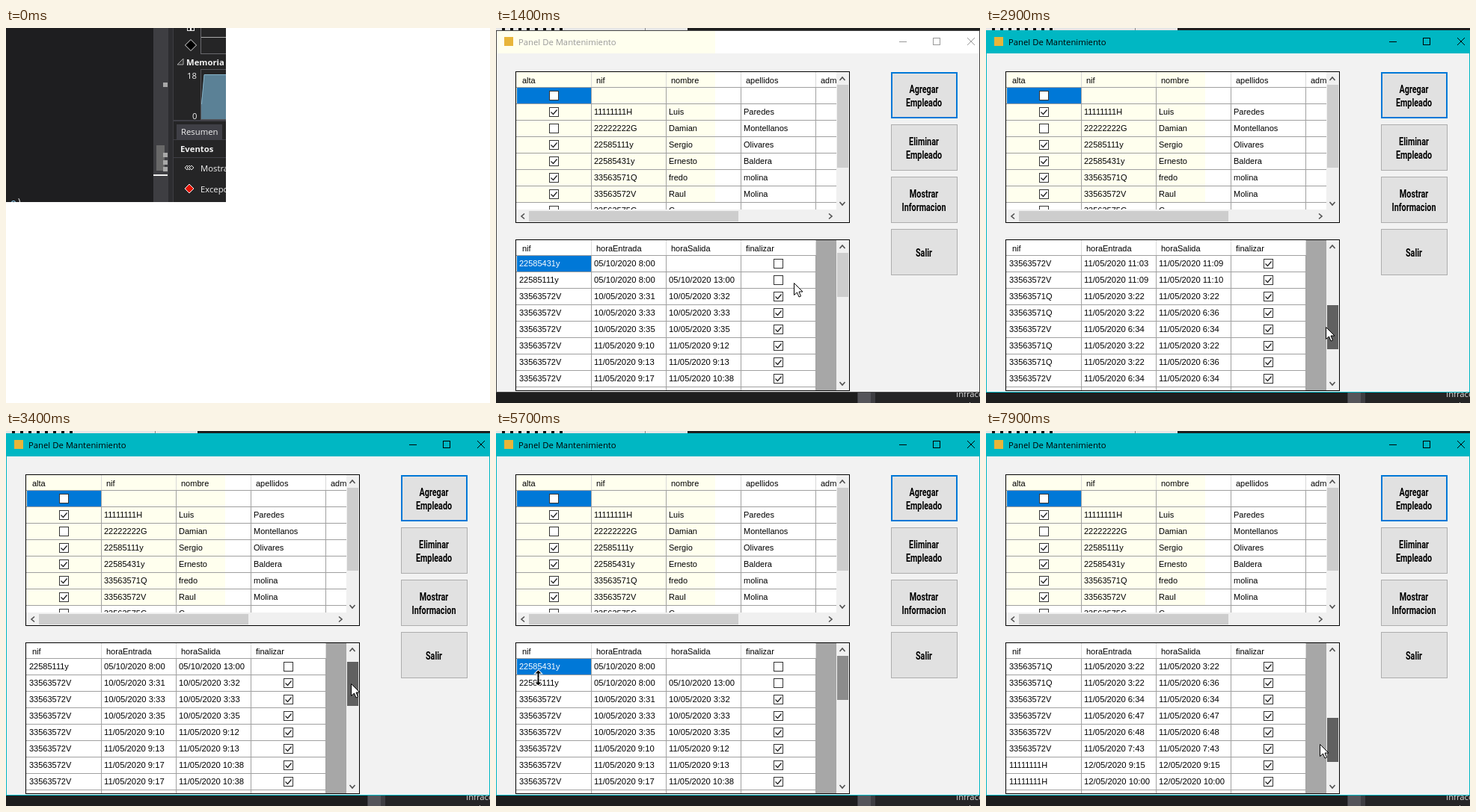
An HTML page with a canvas that plays this animation: 647 by 502 pixels, repeating every 8 s.

```html
<!DOCTYPE html>
<html lang="es">
<head>
<meta charset="utf-8">
<style>
html, body { margin: 0; width: 100%; height: 100%; overflow: hidden; background: #fff; }
canvas { display: block; }
</style>
</head>
<body>
<canvas id="stage" width="647" height="502"></canvas>
<script>
const c = document.getElementById('stage').getContext('2d');
const LOOP = 8000, STEP = 100, ROW = 22, HEAD = 20, COL = 100;
const THUMB_TOP = 301, PX_PER_ROW = 7.75;
const UI = '11.3px "Open Sans", "Noto Sans", sans-serif';
const UI_BOLD = 'bold ' + UI;
const CODE = '13px "DejaVu Sans Mono", monospace';
const GRID = '11px "Liberation Sans", Arial, sans-serif';
const DATE = GRID.replace('11px', '11.3px');
const BLUE = '#0078d7', LINE = '#a0a0a0', TEAL = '#00b7c3', TINT = '#ffffee', PALE = '#f1f1f1';

const people = [
  [''],
  ['11111111H', 'Luis', 'Paredes', true],
  ['22222222G', 'Damian', 'Montellanos'],
  ['22585111y', 'Sergio', 'Olivares', true],
  ['22585431y', 'Ernesto', 'Baldera', true],
  ['33563571Q', 'fredo', 'molina', true],
  ['33563572V', 'Raul', 'Molina', true],
  ['33563575G', 'C']
];
// nif; then day and its "entry-exit" pairs
const shifts = `22585431y 05/10 8:00-
22585111y 05/10 8:00-13:00
33563572V 10/05 3:31-3:32 3:33-3:33 3:35-3:35
33563572V 11/05 9:10-9:12 9:13-9:13 9:17-10:38 10:39-10:39 11:03-11:09 11:09-11:10
33563571Q 11/05 3:22-3:22 3:22-6:36
33563572V 11/05 6:34-6:34 6:47-6:47 6:48-6:48 7:43-7:43
11111111H 12/05 9:15-9:15 10:00-10:00`.split('\n').flatMap(line => {
  const [nif, day, ...pairs] = line.split(' ');
  return pairs.map(p => [nif, ...p.split('-').map(h => h && `${day}/2020 ${h}`)]);
});

// time, x, y
const pointer = [[400, 613, 425], [800, 330, 259], [1000, 123, 300], [1200, 320, 430],
  [1300, 338, 341], [1400, 398, 341], [1700, 464, 330], [2900, 454, 400], [3600, 464, 354],
  [4000, 66, 320], [4300, 438, 338], [4500, 471, 354], [5400, 466, 330], [5700, 56, 330],
  [6300, 420, 345], [6700, 440, 400], [7100, 465, 336], [7900, 446, 419]];
// time, scrolled rows
const scroll = [[2000, 0], [2800, 6], [2900, 9], [3000, 10], [3300, 0], [3600, 3.1],
  [4600, 3.1], [5000, 0], [7100, 0], [7200, 1], [7800, 10.7]];
// from, to, where the pointer holds the thumb
const drags = [[1900, 3700, 29], [4500, 5500, 29], [7200, LOOP, 35]];

const between = (t, a, b) => t >= a && t < b;
const dragAt = t => drags.find(([a, b]) => between(t, a, b));
const firstRow = t => Math.round(at(scroll, t, 1));
const thumbY = t => Math.round(THUMB_TOP + at(scroll, t, 1) * PX_PER_ROW);

function at(keys, t, k) {
  const i = keys.findIndex(p => p[0] >= t);
  if (i < 0) return keys[keys.length - 1][k];
  if (i === 0) return keys[0][k];
  const a = keys[i - 1], b = keys[i];
  return a[k] + (b[k] - a[k]) * (t - a[0]) / (b[0] - a[0]);
}

function rect(x, y, w, h, color) {
  c.fillStyle = color;
  c.fillRect(x, y, w, h);
}
function frame(x, y, w, h, color) {
  c.strokeStyle = color;
  c.lineWidth = 1;
  c.strokeRect(x + .5, y + .5, w - 1, h - 1);
}
function path(points, fill, stroke, width = 1, open) {
  c.beginPath();
  points.forEach(([x, y]) => c.lineTo(x, y));
  if (!open) c.closePath();
  if (fill) { c.fillStyle = fill; c.fill(); }
  if (stroke) { c.strokeStyle = stroke; c.lineWidth = width; c.stroke(); }
}
function text(s, x, y, color = '#000', font = GRID) {
  c.font = font;
  c.fillStyle = color;
  c.fillText(s, x, y);
}
function clipped(x, y, w, h, draw) {
  c.save();
  c.beginPath();
  c.rect(x, y, w, h);
  c.clip();
  draw();
  c.restore();
}
function diamond(x, y, r, fill, stroke) {
  path([[x - r, y], [x, y - r], [x + r, y], [x, y + r]], fill, stroke);
}
function checkbox(x, y, on) {
  rect(x - 6, y - 6, 13, 13, '#fff');
  frame(x - 6, y - 6, 13, 13, '#333');
  if (on) path([[x - 3.5, y + .5], [x - .5, y + 3.5], [x + 4.5, y - 2.5]], null, '#222', 1.3, true);
}
function chevron(x, y, dx, dy) {
  path([[x - dx * 2 - dy * 3.5, y - dy * 2 - dx * 3.5], [x + dx * 2, y + dy * 2],
    [x - dx * 2 + dy * 3.5, y - dy * 2 + dx * 3.5]], null, '#505050', 1.6, true);
}

function drawEditor() {
  rect(0, 0, 647, 502, '#fff');
  clipped(0, 0, 294, 233, () => {
    rect(0, 0, 197, 233, '#1e1e20');
    rect(197, 0, 27, 233, '#3e3e42');
    rect(217, 0, 6, 233, '#2d2d30');
    rect(224, 0, 70, 233, '#252526');
    rect(201, 157, 11, 34, '#686868');
    [73, 167, 177, 186].forEach(y => rect(210, y, 6, 6, '#a8a8a8'));
    rect(197, 196, 19, 2, '#f0f0f0');
    text('e', 6, 238, '#9cdcfe', CODE);
    text(')', 14, 238, '#dcdcdc', CODE);

    [242, 247].forEach(x => frame(x, -4, 5, 8, PALE));
    frame(260, -5, 50, 40, '#6a6a6e');
    rect(261, 12, 33, 1, '#aaa');
    diamond(247, 23, 7.5, '#000', '#e8e8e8');
    path([[237, 41], [237, 49], [229, 49]], '#333', '#aaa');
    text('Memoria (', 241, 50, PALE, UI_BOLD);
    frame(260, 55, 50, 68, '#55555a');
    path([[261, 122], [261, 102], [265, 62], [295, 62], [295, 122]], '#5b8196');
    path([[261.5, 102], [265, 62.5], [295, 62.5]], null, '#86b3c9', 1, true);
    text('18', 242, 68, PALE, UI);
    text('0', 249, 122, PALE, UI);
    rect(228, 129, 61, 20, '#3f3f46');
    [123, 124, 149, 173].forEach(y => rect(224, y, 70, 1, '#3f3f46'));
    text('Resumen', 234, 143, PALE, UI);
    text('Eventos', 233, 166, PALE, UI_BOLD);
    [242, 245, 248].forEach(x => diamond(x, 187, 3, '#333', '#e0e0e0'));
    text('Mostrar', 260, 192, PALE, UI);
    diamond(245, 215, 6, '#e51400', PALE);
    text('Excepciones', 260, 220, PALE, UI);
  });
}

function drawBackdrop() {
  rect(0, 0, 647, 502, '#1e1e1e');
  rect(0, 0, 256, 3, '#e6e6e6');
  for (let x = 8; x < 96; x += 11) rect(x, 0, 4, 3, '#111');
  rect(199, 0, 1, 3, '#888');
  rect(483, 488, 24, 14, '#3e3e42');
  rect(484, 488, 17, 14, '#55555a');
  rect(507, 488, 140, 14, '#252526');
  text('Infracciones', 615, 494, '#ddd', UI);
  text('la', 632, 509, '#ddd', UI);
}

function drawWindow(active) {
  const ink = active ? '#000' : '#999', edge = active ? TEAL : '#444';
  rect(0, 3, 647, 485, '#f2f2f2');
  rect(0, 3, 647, 31, active ? TEAL : '#fff');
  if (!active) rect(0, 3, 293, 31, TINT);
  frame(0, 3, 647, 485, edge);
  rect(11, 12, 12, 12, '#e8b53a');
  text('Panel De Mantenimiento', 30, 23, ink, UI);
  rect(539, 18, 10, 1, ink);
  frame(584, 13, 10, 10, ink);
  path([[630, 13], [640, 23]], null, ink, 1, true);
  path([[640, 13], [630, 23]], null, ink, 1, true);
}

function button(label, i) {
  const y = 59 + 70 * i, edge = i ? 1 : 2, lines = label.split(' ');
  rect(528, y, 89, 62, i ? '#adadad' : BLUE);
  rect(528 + edge, y + edge, 89 - 2 * edge, 62 - 2 * edge, '#e1e1e1');
  c.save();
  c.textAlign = 'center';
  c.translate(572, y + 37 - 9 * (lines.length - 1));
  c.scale(.72, 1); // condensed face
  lines.forEach((s, k) => text(s, 0, k * 18, '#000', 'bold 15px Roboto, sans-serif'));
  c.restore();
}

function gridBase(top, heads) {
  const right = 27 + Math.min(428, COL * heads.length + 1), body = top + HEAD;
  heads.forEach((s, i) => text(s, 35 + COL * i - (i > 0), top + 15));
  for (let y = body; y < top + 201; y += ROW) rect(27, y, right - 27, 1, LINE);
  for (let x = 127; x < right; x += COL) {
    rect(x, top, 1, HEAD, '#d8d8d8');
    rect(x, body, 1, 201 - HEAD, LINE);
  }
}
function vertScroll(top, height, y, h, color) {
  rect(455, top, 17, height, '#f0f0f0');
  rect(456, y, 15, h, color);
  chevron(463, top + 9, 0, -1);
  chevron(463, top + height - 9, 0, 1);
}
function gridBox(top, draw) {
  clipped(27, top, 445, 201, () => {
    rect(27, top, 445, 201, '#fff');
    draw(top + HEAD + 1);
  });
  frame(26, top - 1, 447, 203, '#000');
}

function drawPeople() {
  gridBox(59, body => {
    rect(27, 59, 266, 174, TINT);
    gridBase(59, ['alta', 'nif', 'nombre', 'apellidos', 'admin']);
    rect(28, body, 99, 21, BLUE);
    people.forEach(([nif, name = '', surname = '', on], i) => {
      const y = body + i * ROW;
      checkbox(77, y + 10, on);
      [nif, name, surname].forEach((s, k) => text(s, 131 + COL * k, y + 14));
    });
    rect(27, 243, 445, 17, '#f0f0f0');
    rect(44, 245, 280, 14, '#cdcdcd');
    chevron(36, 252, -1, 0);
    chevron(447, 252, 1, 0);
    vertScroll(59, 185, 76, 111, '#cdcdcd');
  });
}

function thumbColor(t) {
  if (between(t, 5500, 5800)) return '#8c8c8c';
  if (dragAt(t)) return '#606060';
  return between(t, 1600, 1900) || t >= 6900 ? '#a6a6a6' : '#cdcdcd';
}

function drawShifts(t) {
  const first = firstRow(t), before = firstRow(t - STEP);
  const late = Math.max(0, first - before); // bottom rows repaint one step late
  gridBox(284, body => {
    gridBase(284, ['nif', 'horaEntrada', 'horaSalida', 'finalizar']);
    rect(428, 284, 27, 201, '#a7a7a7');
    for (let i = 0; i < 8; i++) {
      const n = i + (i >= 8 - late ? before : first), y = body + i * ROW;
      const [nif, start, end] = shifts[n];
      if (n === 0) rect(28, y, 99, 21, BLUE);
      text(nif, 31, y + 14, n ? '#000' : '#fff');
      text(start, 131, y + 14, '#000', DATE);
      text(end, 231, y + 14, '#000', DATE);
      checkbox(377, y + 10, n > 1);
    }
    vertScroll(284, 201, thumbY(t), 59, thumbColor(t));
  });
}

function drawPointer(t) {
  const drag = dragAt(t);
  const x = Math.round(at(pointer, t, 1));
  const y = drag ? thumbY(t) + drag[2] : Math.round(at(pointer, t, 2));
  c.save();
  c.translate(x + .5, y + .5);
  if (x < 62) {
    const arrow = s => [[0, 10 * s], [4, 6 * s], [1, 6 * s], [1, 0], [-1, 0], [-1, 6 * s], [-4, 6 * s]];
    [-1, 1].forEach(s => path(arrow(s), null, '#fff', 2));
    [-1, 1].forEach(s => path(arrow(s), '#000'));
  } else {
    path([[0, 0], [0, 16], [4, 12.5], [6.5, 18.5], [9, 17.5], [6.5, 11.5], [11.5, 11.5]], '#fff', '#000');
  }
  c.restore();
}

function draw(t) {
  if (t < 200) return drawEditor();
  drawBackdrop();
  drawWindow(t >= 1900);
  ['Agregar Empleado', 'Eliminar Empleado', 'Mostrar Informacion', 'Salir'].forEach(button);
  drawPeople();
  drawShifts(t);
  drawPointer(t);
}

const start = performance.now();
function tick() {
  const t = (performance.now() - start) % LOOP;
  draw(Math.floor(t / STEP) * STEP);
  requestAnimationFrame(tick);
}
tick();
</script>
</body>
</html>
```
